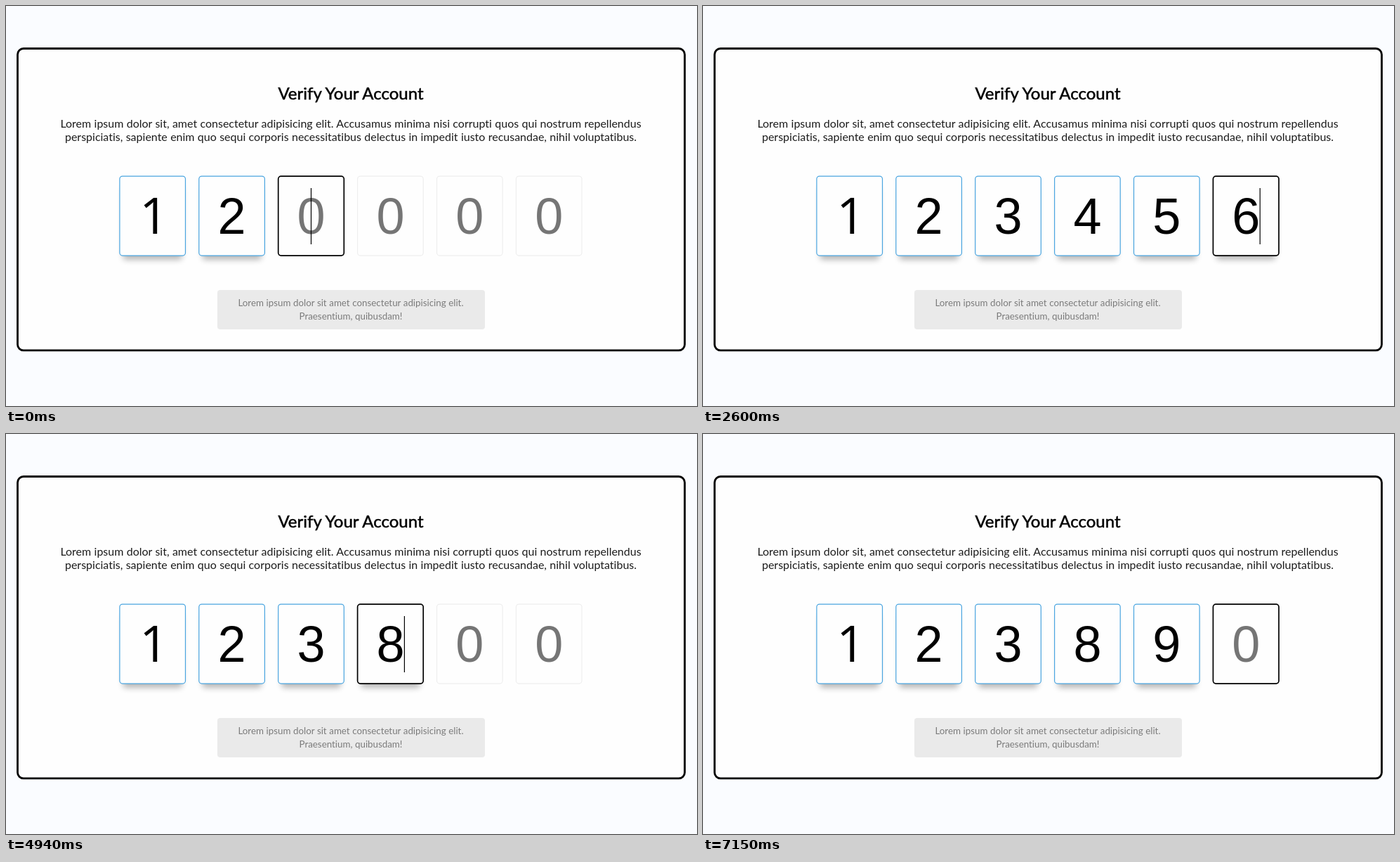
An HTML page for the animation above (7.54 s loop, 984 by 569 pixels).

```html
<!DOCTYPE html>
<html lang="en">
<head>
<meta charset="utf-8">
<title>Verify Your Account</title>
<style>
  html, body { margin: 0; width: 100%; height: 100%; overflow: hidden; background: #fafcff; }
  svg { display: block; font-family: Lato, sans-serif; font-variant-ligatures: none; text-anchor: middle; }
  .title { font-size: 24px; stroke: #000; stroke-width: .5px; }
  .intro { font-size: 16px; word-spacing: .25px; fill: #1c1c1c; }
  .note { font-size: 13.33px; word-spacing: .2px; fill: #7b7b7b; }
  .digit { font: 72px "Liberation Sans", Arial, sans-serif; fill: #757575; }
  /* a numeral one without a foot */
  .one { font-family: "Open Sans", sans-serif; }
  .frame { fill: #fefefe; stroke: #eee; stroke-width: 1.2px; }
  .shadow { fill: #000; opacity: 0; filter: blur(4.5px); }
  .filled .digit { fill: #000; }
  .filled .frame { stroke: #4aa5e0; }
  .filled .shadow { opacity: .28; }
  .focused .frame { stroke: #000; stroke-width: 1.7px; }
</style>
</head>
<body>
<svg width="984" height="569" viewBox="0 0 984 569">
  <rect x="16.5" y="60.5" width="950" height="429.4" rx="8.5" fill="#fefefe" stroke="#000" stroke-width="2.8"/>
  <text class="title" x="491" y="133">Verify Your Account</text>
  <text class="intro" x="491" y="172.7">Lorem ipsum dolor sit, amet consectetur adipisicing elit. Accusamus minima nisi corrupti quos qui nostrum repellendus</text>
  <text class="intro" x="491" y="191.7">perspiciatis, sapiente enim quo sequi corporis necessitatibus delectus in impedit iusto recusandae, nihil voluptatibus.</text>
  <g id="cells"></g>
  <rect id="caret" y="259" width="1.2" height="80"/>
  <rect x="301" y="404" width="381" height="56" rx="4" fill="#eaeaea"/>
  <text class="note" x="491" y="427">Lorem ipsum dolor sit amet consectetur adipisicing elit.</text>
  <text class="note" x="491" y="446">Praesentium, quibusdam!</text>
  <path id="pointer" d="M.5.5V15L3.8 11.9 6 17 8.3 16 6.1 11H10.2Z" fill="#fff" stroke="#444"/>
</svg>
<script>
const LOOP = 7540;
const PITCH = 112.9;
const DIGIT_WIDTH = 40;

// [start ms, typed digits, focused cell, caret visible]
const states = [
  [0, '12', 2, true],
  [650, '123', 3, true],
  [1170, '1234', 4, true],
  [1560, '12345', 4, true],
  [1690, '12345', 5, true],
  [2080, '12345', 5, false],
  [2600, '123456', 5, true],
  [3120, '123456', 5, false],
  [3510, '12345', 4, true],
  [3900, '1234', 3, true],
  [4420, '1234', 3, false],
  [4940, '1238', 3, true],
  [5070, '1238', 4, true],
  [5460, '12389', 5, true],
  [5980, '12389', 5, false],
  [6630, '12389', 5, true],
  [7150, '12389', 5, false],
];

const byId = id => document.getElementById(id);
const caret = byId('caret');
const pointer = byId('pointer');
const cellCenter = i => 208.7 + PITCH * i;

byId('cells').innerHTML = Array.from({ length: 6 }, (_, i) => {
  const x = cellCenter(i);
  return `<g>
    <rect class="shadow" x="${x - 42}" y="257" width="84" height="104" rx="4"/>
    <rect class="frame" x="${x - 46.8}" y="242.1" width="93.6" height="113" rx="4"/>
    <text class="digit" x="${x}" y="324">0</text>
  </g>`;
}).join('');
const cells = [...byId('cells').children];

function drawCell(cell, i, digits, focus) {
  const digit = digits[i] ?? '0';
  const label = cell.querySelector('text');
  cell.classList.toggle('filled', i < digits.length);
  cell.classList.toggle('focused', i === focus);
  label.classList.toggle('one', digit === '1');
  label.setAttribute('dx', digit === '1' ? 2 : 0);
  label.textContent = digit;
}

function drawPointer(t) {
  const shown = t >= 6500 && t < 6890;
  const step = Math.floor((t - 6500) / 130);
  pointer.style.display = shown ? '' : 'none';
  if (shown) pointer.setAttribute('transform', `translate(${191 - 4 * step} ${506.5 + 25 * step})`);
}

function draw(now) {
  const t = now % LOOP;
  const [, digits, focus, caretOn] = states.findLast(([start]) => start <= t);
  cells.forEach((cell, i) => drawCell(cell, i, digits, focus));
  const offset = focus < digits.length ? DIGIT_WIDTH / 2 : 0;
  caret.setAttribute('x', cellCenter(focus) + offset - .6);
  caret.style.display = caretOn ? '' : 'none';
  drawPointer(t);
}

function tick() {
  draw(performance.now());
  requestAnimationFrame(tick);
}
tick();
</script>
</body>
</html>
```
